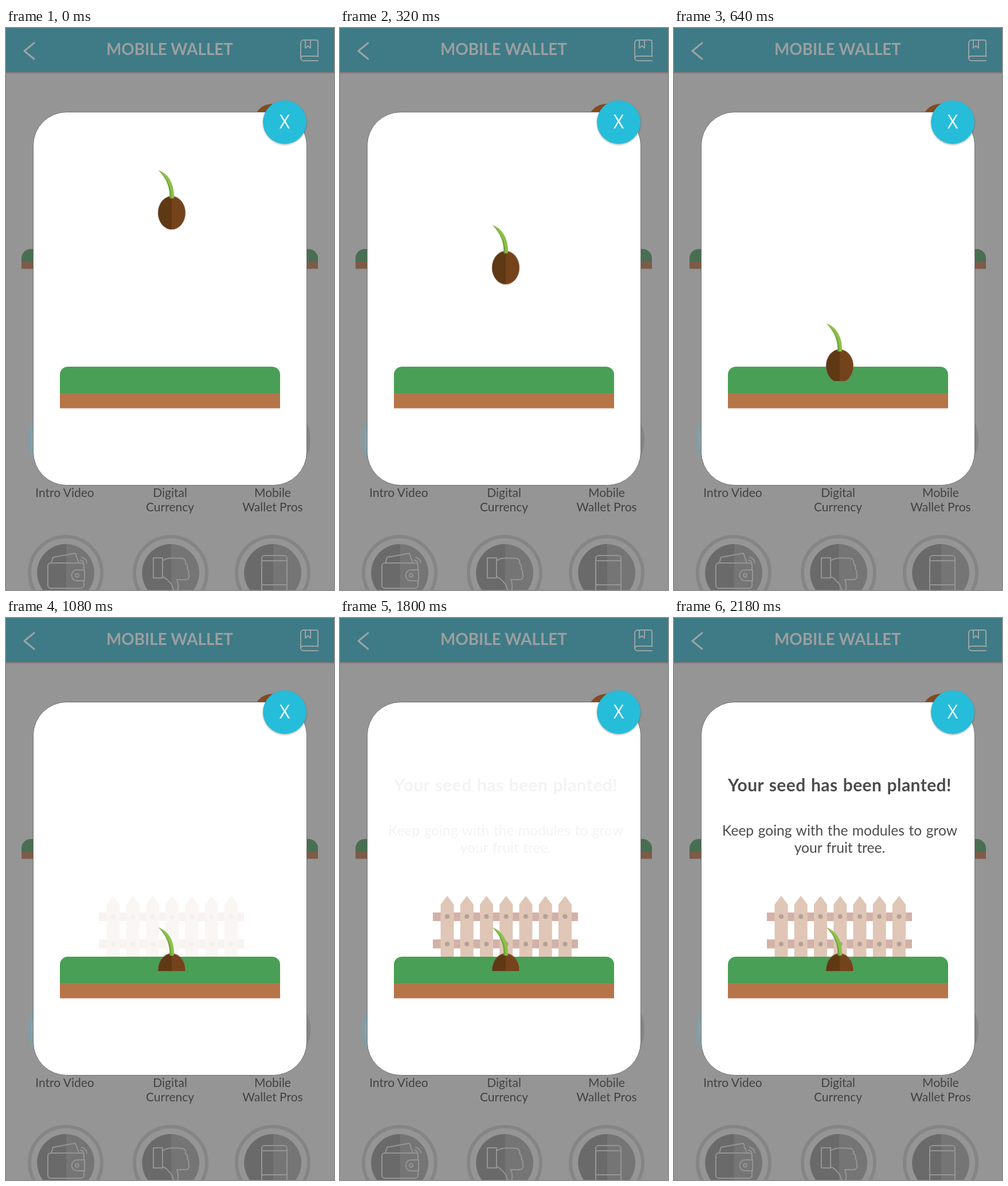
These frames come from a looping animation (572 px wide and 979 px high, 9540 ms). An HTML page:

```html
<!DOCTYPE html>
<html lang="en">
<head>
<meta charset="utf-8">
<title>Seed planted</title>
<style>
  html, body { margin: 0; width: 100%; height: 100%; overflow: hidden; background: #959595; }
  svg { display: block; width: 572px; height: 979px; }
  text { font-family: Lato, "Open Sans", sans-serif; text-anchor: middle; }
  .heading { font-size: 27.8px; font-weight: 700; fill: #9c9fa0; }
  .label { font-size: 21px; fill: #424242; }
  .close { font-family: "Open Sans", sans-serif; font-size: 32px; fill: #fff; }
  .title { font-size: 30px; font-weight: 700; letter-spacing: .42px; word-spacing: 1.5px; }
  .body { font-size: 24.6px; word-spacing: 1.2px; }
  .line { fill: none; stroke: #959595; stroke-width: 2; stroke-linecap: round; stroke-linejoin: round; }
  .head-icon { stroke: #9ba3a5; }
  .back { stroke-width: 3; }
  #message { fill: #4b4b4b; opacity: 0; }
  #fence { opacity: 0; }
</style>
</head>
<body>
<svg viewBox="0 0 572 979">
  <defs>
    <linearGradient id="drop" x2="0" y2="1">
      <stop stop-color="#000" stop-opacity=".3"/>
      <stop offset="1" stop-color="#000" stop-opacity="0"/>
    </linearGradient>
    <filter id="soft" x="-20%" y="-20%" width="140%" height="140%">
      <feGaussianBlur stdDeviation="1.5"/>
    </filter>
    <clipPath id="soil"><rect x="240" y="200" width="100" height="415"/></clipPath>
    <g id="badge">
      <circle r="63" fill="none" stroke="#858585" stroke-width="6"/>
      <circle r="50" fill="#757575"/>
      <path d="M1-50A50 50 0 0 0 1 50Z" fill="#6a6a6a"/>
    </g>
  </defs>

  <!-- dimmed page -->
  <rect width="572" height="979" fill="#959595"/>
  <rect y="76" width="572" height="4" fill="url(#drop)"/>
  <rect width="572" height="76" fill="#3e7b86"/>
  <path class="line head-icon back" d="M49 26L32 40L49 54"/>
  <text class="heading" x="285.500" y="47">MOBILE WALLET</text>
  <path class="line head-icon" d="M544 50V24a3 3 0 0 0-3-3H519a5 5 0 0 0-5 5V52a5 5 0 0 0 5 5H544M514 53a5 5 0 0 1 5-4H544M522 21V35l4.500-4 4.500 4V21"/>

  <circle cx="465" cy="166" r="34" fill="#834a22"/>
  <path d="M27 407V401a16 16 0 0 1 16-16H528a16 16 0 0 1 16 16V407Z" fill="#486f51"/>
  <rect x="27" y="407" width="517" height="12.500" fill="#7c5b49"/>

  <circle cx="104" cy="717" r="63" fill="#90a2a6" stroke="#829da4" stroke-width="6"/>
  <use href="#badge" x="465" y="717"/>

  <text class="label" x="102.500" y="817">Intro Video</text>
  <text class="label" x="286" y="817">Digital</text>
  <text class="label" x="286" y="842">Currency</text>
  <text class="label" x="465" y="817">Mobile</text>
  <text class="label" x="465" y="842">Wallet Pros</text>

  <use href="#badge" x="104" y="949"/>
  <use href="#badge" x="287" y="949"/>
  <use href="#badge" x="465" y="949"/>
  <g class="line">
    <path d="M136 943V937a5 5 0 0 0-5-5H78a5 5 0 0 0-5 5V971a5 5 0 0 0 5 5H131a5 5 0 0 0 5-5V963"/>
    <path d="M79 932L82 922L121 915L127 932"/>
    <path d="M137 944H124a9.500 9.500 0 0 0 0 19H137Z"/>
    <circle cx="124" cy="953.500" r="3"/>
    <path d="M130 927q5 1 6 6M132 922q8 2 9 10"/>
    <path d="M257 923H273V958H257Z"/>
    <path d="M273 928C282 922 291 923 308 924C313 925 314 930 313 933C317 935 317 940 316 942C319 944 319 949 318 951C321 954 319 961 313 961H298C301 970 302 980 296 981C290 981 292 971 286 966C281 961 279 957 273 956"/>
    <path d="M446 995V924a5 5 0 0 1 5-5H485a5 5 0 0 1 5 5V995M446 928H490M446 970H490"/>
  </g>

  <!-- card -->
  <rect x="47.500" y="146.500" width="477" height="650" rx="58" fill="#fff" stroke="#707070"/>
  <circle cx="486" cy="165.500" r="38" fill="#000" opacity=".3" filter="url(#soft)"/>
  <circle cx="486" cy="164" r="38" fill="#26bdda"/>
  <text class="close" x="486" y="175">X</text>

  <g id="message">
    <text class="title" x="289" y="302">Your seed has been planted!</text>
    <text class="body" x="289" y="378.500">Keep going with the modules to grow</text>
    <text class="body" x="289" y="408.500">your fruit tree.</text>
  </g>

  <g id="fence">
    <path d="M162 513H415V528H162ZM162 560H415V575.500H162Z" fill="#d2b1a8"/>
  </g>

  <path d="M94 636V604a14 14 0 0 1 14-14H464a14 14 0 0 1 14 14V636Z" fill="#489f55"/>
  <rect x="94" y="636" width="384" height="26.500" fill="#b67549"/>

  <g clip-path="url(#soil)">
    <g id="seed">
      <ellipse cx="289" cy="322" rx="23.800" ry="29" fill="#75431b"/>
      <path d="M289 293A23.800 29 0 0 0 289 351Z" fill="#5f3814"/>
      <ellipse cx="289" cy="322" rx="23.800" ry="29" fill="none" stroke="#8a7767" stroke-width=".7"/>
      <path d="M266 248C283 253 294 272 293 296Q289 298 285.500 296C286 277 280 262 266 248Z" fill="#8bc04a"/>
      <path d="M266 248C280 259 288 275 288.500 297L285.500 296C286 277 280 262 266 248Z" fill="#6fa23b"/>
    </g>
  </g>
</svg>

<script>
  const LOOP = 9540;
  const byId = id => document.getElementById(id);

  const fence = byId('fence');
  function add(tag, attrs) {
    const el = document.createElementNS('http://www.w3.org/2000/svg', tag);
    for (const key in attrs) el.setAttribute(key, attrs[key]);
    fence.append(el);
  }
  for (let i = 0; i < 7; i++) {
    const x = 187 + i * 34.25;
    add('path', { d: `M${x - 11.5} 592V499L${x} 484L${x + 11.5} 499V592Z`, fill: '#e0c6b6' });
    for (const cy of [520, 568]) add('circle', { cx: x, cy, r: 4, fill: '#b5a095' });
  }

  const play = (el, frames) =>
    el.animate(frames, { duration: LOOP, iterations: Infinity }).startTime = 0;

  // Rows of [time, opacity], each held until the next one
  const fade = (el, rows) => play(el, [[0, 0], ...rows, [LOOP, 1]].map(([t, opacity]) =>
    ({ offset: t / LOOP, opacity, easing: 'steps(1, end)' })));

  const FALL_START = 3, FALL_TIME = 800;
  const aloft = 'translateY(0px)', landed = 'translateY(291.3px)';
  play(byId('seed'), [
    { offset: 0, transform: aloft },
    { offset: FALL_START / LOOP, transform: aloft, easing: 'ease-in-out' },
    { offset: (FALL_START + FALL_TIME) / LOOP, transform: landed },
    { offset: 1, transform: landed }
  ]);
  fade(fence, [[1080, .15], [1200, .33], [1300, .5], [1380, .67], [1480, .84], [1800, 1]]);
  fade(byId('message'), [[1800, .06], [1880, .16], [1960, .3], [2020, .44],
    [2060, .58], [2100, .73], [2140, .87], [2180, 1]]);
</script>
</body>
</html>
```
